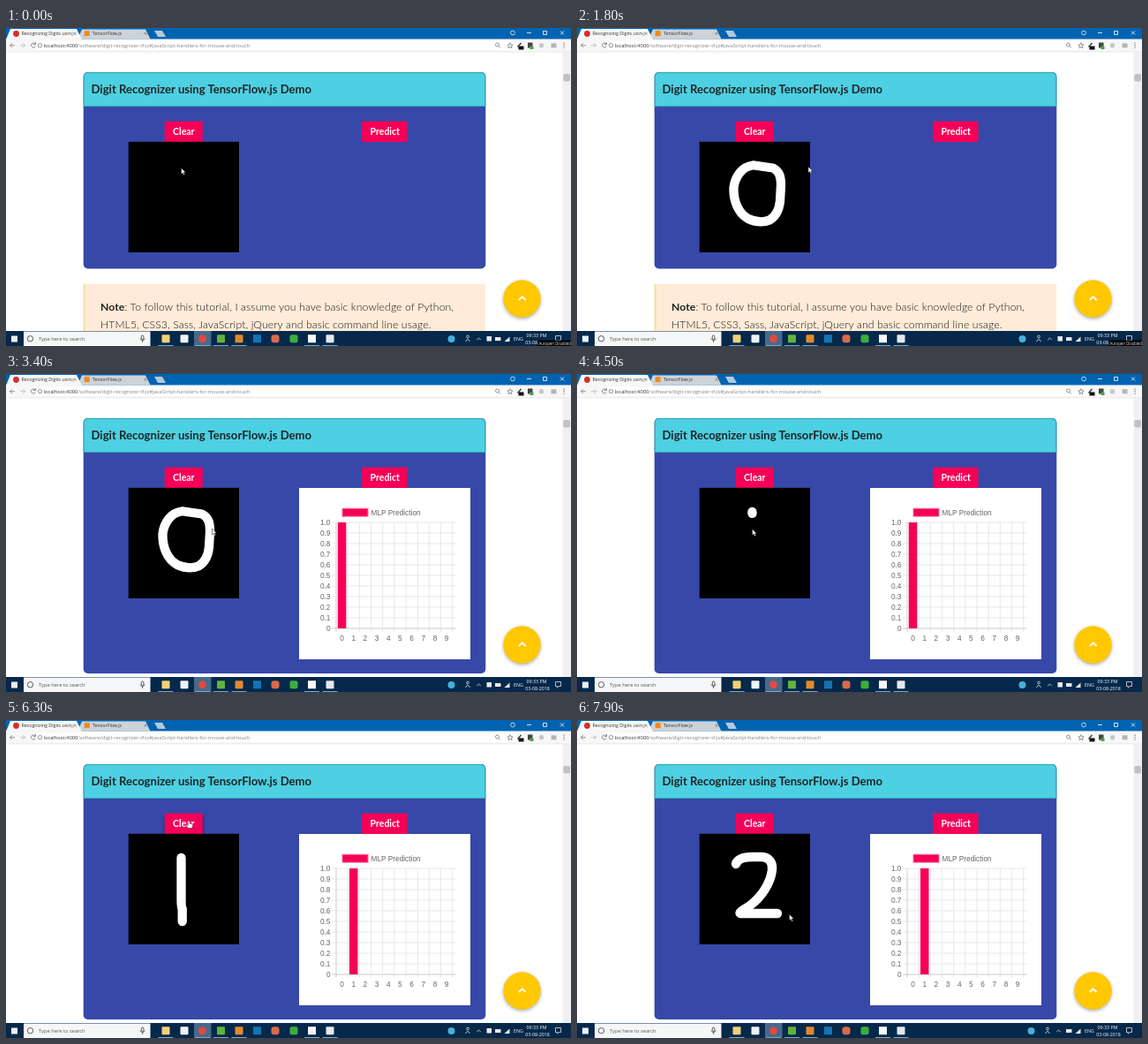
An HTML page for the animation above (8000 ms loop, 640x360 px).

```html
<!DOCTYPE html>
<html lang="en">
<head>
<meta charset="utf-8">
<title>Digit recognizer demo</title>
<style>
html, body { margin: 0; width: 100%; height: 100%; overflow: hidden; background: #fff; }
svg { display: block; width: 640px; height: 360px; }
.ui { font-family: "Open Sans", "Noto Sans", sans-serif; font-size: 5.75px; }
.page { font-family: Lato, "Open Sans", sans-serif; }
.title { font-size: 13.1px; font-weight: 700; fill: #202428; }
.btn { font-size: 10.5px; font-weight: 700; fill: #fff; text-anchor: middle; }
.note { font-size: 12.2px; fill: #151515; font-weight: 300; letter-spacing: .1px; }
.note tspan { font-weight: 700; fill: #222; }
.chart { font-family: "Liberation Sans", Arial, sans-serif; font-size: 8.3px; fill: #666; }
.ink { fill: none; stroke: #fff; stroke-width: 10.3; stroke-linecap: round; stroke-linejoin: round; }
.line { fill: none; stroke: #777; stroke-width: .8; }
.tray { fill: none; stroke: #dfe4e8; stroke-width: .8; }
.dark { fill: none; stroke: #333; stroke-width: .8; }
</style>
</head>
<body>
<svg viewBox="0 0 640 360">
  <defs>
    <filter id="soft" x="-40%" y="-40%" width="180%" height="180%"><feGaussianBlur stdDeviation="2"/></filter>
  </defs>
  <rect width="640" height="360" fill="#fff"/>

  <g class="page">
    <g id="note">
      <rect x="87.700" y="290" width="455.500" height="70" fill="#ffebd7"/>
      <path d="M88.700 290V360" stroke="#f6dfa0" stroke-width="2"/>
      <text class="note" x="107" y="320"><tspan>Note</tspan>: To follow this tutorial, I assume you have basic knowledge of Python,</text>
      <text class="note" x="107" y="339.500">HTML5, CSS3, Sass, JavaScript, jQuery and basic command line usage.</text>
    </g>
    <rect id="panel" x="87.700" y="50" width="455.600" height="222.500" rx="5" fill="#3848a8"/>
    <path d="M88.200 88.500V55a4.500 4.500 0 0 1 4.500-4.500H538.300a4.500 4.500 0 0 1 4.500 4.500V88.500Z" fill="#4dd0e1" stroke="#2fa5b5"/>
    <text class="title" x="96.500" y="74">Digit Recognizer using TensorFlow.js Demo</text>
    <rect id="clearShade" x="180" y="109" width="43" height="23" opacity=".45" filter="url(#soft)"/>
    <rect x="179.700" y="105.700" width="43" height="23.300" fill="#f50057"/>
    <text class="btn" x="201.300" y="121">Clear</text>
    <rect id="predictShade" x="404" y="109" width="51" height="23" opacity=".45" filter="url(#soft)"/>
    <rect x="403.200" y="105.700" width="51.300" height="23.300" fill="#f50057"/>
    <text class="btn" x="429.300" y="121">Predict</text>
    <rect x="138.700" y="128.800" width="125.300" height="125.200" fill="#000"/>
    <g id="inks"></g>
  </g>

  <g id="chart" class="chart">
    <rect x="332" y="129" width="194" height="194" fill="#fff"/>
    <rect x="381" y="152.200" width="29" height="9" fill="#f50057" stroke="#ff6f9c"/>
    <text x="413.500" y="160">MLP Prediction</text>
    <g id="grid"></g>
    <rect id="bar" y="168" width="9.500" height="120" fill="#f50057"/>
  </g>

  <circle cx="584.500" cy="308" r="21" opacity=".35" filter="url(#soft)"/>
  <circle cx="584.500" cy="306.500" r="21.200" fill="#ffc800"/>
  <path d="M580.800 308l3.900-3.600 3.900 3.600" fill="none" stroke="#fff" stroke-width="1.900"/>

  <rect x="630.500" y="27" width="9.500" height="316" fill="#f0f0f0"/>
  <rect x="631.300" y="52" width="7.700" height="8.500" rx="2" fill="#c1c1c1"/>

  <g id="browser" class="ui">
    <rect width="640" height="13" fill="#0063b1"/>
    <path d="M81 12.500L86 1.500H158L163.500 12.500Z" fill="#cdd3d8"/>
    <path d="M168 3H177L181 10H172Z" fill="#b4c8da"/>
    <path d="M0 13L5 1H80L86 13Z" fill="#f7f7f7"/>
    <rect y="12.500" width="640" height="14.500" fill="#f7f7f7"/>
    <path d="M0 27H640" stroke="#dcdcdc" stroke-width=".6"/>
    <rect x="35" y="14.500" width="543" height="10.500" rx="1" fill="#fff"/>
    <circle cx="11.500" cy="6.500" r="3.400" fill="#d32f2f"/>
    <text x="17.500" y="8.300" font-size="5.300" fill="#333">Recognizing Digits usin<tspan fill="#999">g</tspan></text>
    <rect x="88.700" y="3.200" width="6" height="6" fill="#f08a1c"/>
    <text x="98" y="8.300" font-size="5.300" fill="#333">TensorFlow.js</text>
    <path d="M76.500 4.800l3 3m0-3l-3 3M156.500 4.800l3 3m0-3l-3 3" stroke="#666" stroke-width=".7"/>
    <path d="M10 19.700H4.500m2.500-2.500l-2.500 2.500 2.500 2.500" class="line"/>
    <path d="M16 19.700H21.500m-2.500-2.500l2.500 2.500-2.500 2.500" class="line" opacity=".5"/>
    <path d="M33 18a2.500 2.500 0 1 0 .3 2.500M33.500 16v2.500h-2.500" class="line"/>
    <circle cx="38.500" cy="19.700" r="2.200" class="line"/>
    <text x="42.500" y="21.700" fill="#808080"><tspan fill="#333">localhost:4000</tspan>/software/digit-recognizer-tf-js#javaScript-handlers-for-mouse-and-touch</text>
    <circle cx="556.500" cy="19" r="2" class="line"/><path d="M558 20.500l2 2" class="line"/>
    <path d="M571 16.700l.9 2.100 2.200.2-1.700 1.500.6 2.200-2-1.200-2 1.200.6-2.200-1.700-1.500 2.200-.2Z" class="line"/>
    <path d="M579.500 21.500l4-4.500" stroke="#333" stroke-width="1.300"/>
    <rect x="580.500" y="20.500" width="6" height="4" fill="#111"/>
    <rect x="591" y="16.500" width="5.500" height="6" fill="#444"/><rect x="593.500" y="20.500" width="4" height="3.500" fill="#48a34a"/>
    <circle cx="606.500" cy="19.700" r="2.700" fill="#c7c7c7"/>
    <rect x="617.500" y="17.300" width="6" height="5" fill="#b5b5b5"/>
    <g fill="#666"><circle cx="632" cy="17.300" r=".7"/><circle cx="632" cy="19.700" r=".7"/><circle cx="632" cy="22.100" r=".7"/></g>
    <circle cx="574" cy="5.500" r="2.400" fill="none" stroke="#fff" stroke-width=".7"/>
    <path d="M590 5.500h5M608.500 3.500h4v4h-4ZM628 3.500l4 4m0-4l-4 4" fill="none" stroke="#fff" stroke-width=".8"/>
  </g>

  <g id="taskbar" class="ui">
    <rect y="343" width="640" height="17" fill="#06284a"/>
    <rect x="6" y="348.500" width="7" height="7" fill="#e9f1f7"/>
    <rect x="20" y="343.500" width="143.500" height="16.500" fill="#f5f6f7"/>
    <circle cx="27.500" cy="351.700" r="3.200" class="dark" stroke-width="1.100"/>
    <text x="37" y="354" fill="#555">Type here to search</text>
    <rect x="153.300" y="348" width="2.600" height="4.500" rx="1.300" class="dark"/><path d="M152 351.500q2.600 4.600 5.200 0M154.600 353.800v2" class="dark"/>
    <rect x="213" y="343" width="19.500" height="17" fill="#466a8c"/>
    <g id="apps"></g>
    <g id="status">
      <circle cx="504.500" cy="352" r="4" fill="#48b0da"/>
      <circle cx="523" cy="349.500" r="1.400" class="tray"/><path d="M520.500 355q2.500-5 5 0" class="tray"/>
      <path d="M533.200 353.200l2.300-2.300 2.300 2.300" class="tray"/>
    </g>
    <rect id="plug" x="544.500" y="349" width="5.500" height="5.500" fill="#e6e9ec"/>
    <rect x="554" y="350" width="6.500" height="4" fill="#e6e9ec"/>
    <path d="M564.500 355h6v-5.500Z" fill="#e6e9ec"/>
    <text x="575" y="354" font-size="5.300" fill="#fff">ENG</text>
    <g fill="#fff" font-size="5.300" text-anchor="middle"><text x="601" y="350">09:33 PM</text><text x="602" y="358.300">03-08-2018</text></g>
    <path d="M622.500 348.500h6v5h-2.500l-1.700 1.700v-1.700h-1.800Z" class="tray"/>
    <g id="tip"><rect x="602.500" y="353.500" width="37.500" height="6.500" fill="#000"/><text x="603.500" y="358.600" font-size="4.400" fill="#ddd">Autopen Disabled</text></g>
  </g>

  <g id="pointer" stroke="#111" stroke-width=".5" fill="#fff">
    <path id="arrow" d="M0 0V7L1.600 5.600 2.800 8.100 4 7.500 2.900 5.100H5Z"/>
    <path id="hand" d="M-.9 .7Q0-.7 .9 .7V3.600L4 4.400Q4.800 4.700 4.500 6L3.700 9H-.8L-3 5.900Q-3.300 4.700-2.200 4.900L-.9 6Z"/>
  </g>
</svg>
<script>
const LOOP = 8000, LAG = 100;
const $ = id => document.getElementById(id);
const show = (id, on) => $(id).setAttribute("visibility", on ? "visible" : "hidden");

function add(parent, tag, attrs, text) {
  const node = document.createElementNS("http://www.w3.org/2000/svg", tag);
  for (const key in attrs) node.setAttribute(key, attrs[key]);
  if (text) node.textContent = text;
  return $(parent).appendChild(node);
}

// Chart axes
const STEP = 13.17, LEFT = 374;
for (let i = 0; i <= 10; i++) {
  const x = LEFT + i * STEP, y = 288 - i * 12;
  const color = i ? "#dedede" : "#b5b5b5";
  add("grid", "path", { d: `M${x} 168V292M369 ${y}H509.5`, stroke: color, "stroke-width": .7 });
  add("grid", "text", { x: 367.5, y: y + 2.9, "text-anchor": "end" }, i ? (i / 10).toFixed(1) : "0");
  if (i < 10) add("grid", "text", { x: x + STEP / 2, y: 302, "text-anchor": "middle" }, String(i));
}

// Taskbar buttons: centre, colour, corner radius, open
[[181, "#f0d078", 1, 1], [202, "#eef2f5", 1, 0], [222.5, "#e04a3f", 4.5, 1], [243.5, "#62b33c", 1, 1],
 [264, "#e08a2c", 1, 1], [284.5, "#1673b4", 0, 0], [305, "#d96a4a", 3, 0], [326, "#3cae3c", 2, 0],
 [346.500, "#f7f7f7", 0, 1], [367, "#e4e9ee", 1, 1]].forEach(([x, fill, rx, open]) => {
  add("apps", "rect", { x: x - 4.5, y: 347.2, width: 9, height: 9, rx, fill });
  if (open) add("apps", "rect", { x: x - 8.5, y: 359, width: 17, height: 1, fill: "#76a9d0" });
});

const strokes = [
  { from: 200, to: 1500, end: 3900, d: "M199 155.500C187 157 179 168 177.500 181C177 196 183 210 194 216C203 220 212 220 218 217.500C226 213 229 205 230 196L231 178C231 168 229 162 222 158.500L201 155.500" },
  { from: 4390, to: 4800, end: 6420, d: "M198.500 156V203Q198.500 212 199.700 214V228" },
  { from: 6750, to: 7700, end: LOOP, d: "M180 163C182 157 190 155 199 155H209C218 155 222 162 221 170C219 186 208 201 196 210C188 215 183 218 185 219H227" }
];
for (const s of strokes) {
  s.path = add("inks", "path", { d: s.d, class: "ink" });
  s.length = s.path.getTotalLength();
}

// Pointer tip: time, x, y
const moves = [
  [0, 198.5, 158.5], [200, 199, 155], [1500, 201, 155.5], [1800, 262, 157], [2300, 440, 119],
  [2600, 444, 119], [2900, 441, 120], [3400, 233.5, 175], [3750, 206, 115], [3980, 206, 115],
  [4300, 198.5, 156], [4390, 198.5, 156], [4800, 199.7, 228], [5300, 430, 118], [5650, 430, 118],
  [6150, 207, 113.5], [6450, 207, 113.5], [6700, 180, 163], [6750, 180, 163], [7700, 227, 219],
  [7900, 240.5, 220], [8000, 240.5, 220]
];

const clamp = v => Math.max(0, Math.min(1, v));
const ramp = (t, from, to) => clamp((t - from) / (to - from));

function tipAt(t) {
  const s = strokes.find(s => t >= s.from && t <= s.to);
  if (s) {
    const p = s.path.getPointAtLength(s.length * ramp(t, s.from, s.to));
    return [p.x, p.y];
  }
  const i = moves.findIndex(m => m[0] > t);
  const [t0, x0, y0] = moves[i - 1], [t1, x1, y1] = moves[i];
  const k = ramp(t, t0, t1), e = k * k * (3 - 2 * k);
  return [x0 + (x1 - x0) * e, y0 + (y1 - y0) * e];
}

function render(t) {
  for (const s of strokes) {
    const visible = t >= s.from + LAG && t < s.end;
    s.path.setAttribute("visibility", visible ? "visible" : "hidden");
    const drawn = s.length * ramp(t - LAG, s.from, s.to);
    s.path.setAttribute("stroke-dasharray", `${Math.max(.01, drawn)} 999`);
  }

  const [x, y] = tipAt(t);
  const inRow = y > 106 && y < 129;
  const onClear = inRow && x > 180 && x < 222.5;
  const onPredict = inRow && x > 403.5 && x < 454.5;
  $("pointer").setAttribute("transform", `translate(${x} ${y})`);
  show("hand", onClear || onPredict);
  show("arrow", !onClear && !onPredict);
  show("clearShade", onClear);
  show("predictShade", onPredict);

  const open = t >= 2700, second = t >= 5500;
  show("chart", open);
  $("panel").setAttribute("height", open ? 289 : 222.5);
  $("note").setAttribute("transform", `translate(0 ${open ? 67 : 0})`);
  const start = second ? 5500 : 2700;
  const height = 120 * (1 - (1 - ramp(t, start, start + 800)) ** 4);
  $("bar").setAttribute("x", LEFT + 1.8 + (second ? STEP : 0));
  $("bar").setAttribute("y", 288 - height);
  $("bar").setAttribute("height", height);

  show("tip", t < 2200);
  const shifted = t >= 7300;
  $("status").setAttribute("transform", `translate(${shifted ? 10 : 0} 0)`);
  show("plug", !shifted);
}

function tick() {
  render(performance.now() % LOOP);
  requestAnimationFrame(tick);
}
tick();
</script>
</body>
</html>
```
